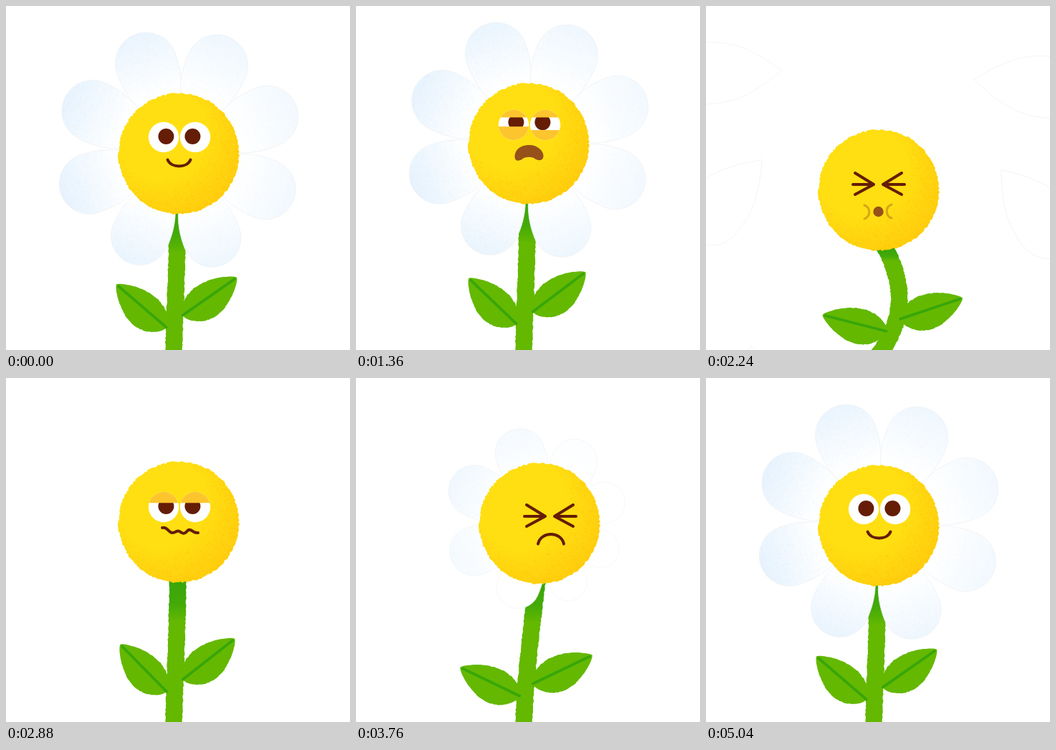
An HTML page with a canvas that plays this animation: 480 by 480 pixels, repeating every 5.12 s.

```html
<!DOCTYPE html>
<html lang="en">
<head>
<meta charset="utf-8">
<title>Sneezing daisy</title>
<style>
html, body { margin: 0; width: 100%; height: 100%; overflow: hidden; background: #fff; }
canvas { display: block; width: 480px; height: 480px; }
</style>
</head>
<body>
<canvas id="stage" width="480" height="480"></canvas>
<script>
const LOOP = 5120, STEP = 80, TAU = Math.PI * 2;
const BROWN = '#651d06', MOUTH = '#96501a', GREEN = '#64b800', DARK = '#38a60a', LID = '#fcc52e';
const INHALE = 400, SNEEZE = 1840, BURST = 1920, CALM = 2440, STRAIN = 3440, SPROUT = 3520, RELIEF = 4080;
const CENTER = 241;
const ctx = document.getElementById('stage').getContext('2d');

let seed = 7;
const rnd = () => (seed = seed * 16807 % 2147483647) / 2147483647;
const clamp = x => Math.max(0, Math.min(1, x));
const mix = (a, b, k) => a + (b - a) * k;
const ease = x => x * x * (3 - 2 * x);
const progress = (t, from, to) => clamp((t - from) / (to - from));

// face: drop of the face on the head; fold, lift: leaves; top, low: eyelids; gape: mouth
const idle = { headY: 206, face: 0, fold: 0, lift: 0, top: 0, low: 0, gape: .3 };
const breathe = { headY: 202, face: -2, fold: -1.5, lift: 1, top: 0, low: .35, gape: .7 };
const gasp = { headY: 192, face: -3, fold: -2.5, lift: 5, top: .26, low: .45, gape: 1 };
const brim = { headY: 176, face: -6, fold: -4, lift: 6, top: .4, low: .5, gape: 1.3 };
const sneeze = { headY: 257, face: 15, fold: 22, lift: -5, top: .8, low: 0, gape: 1 };
const tired = { headY: 201, face: 2, fold: -4, lift: 11, top: .37, low: 0, gape: 1 };
const push = { headY: 203, face: 13, fold: 12.5, lift: 5, top: .6, low: 0, gape: 1 };
const leap = { headY: 184, face: -2, fold: -4, lift: 6, top: 0, low: 0, gape: 1 };
const timeline = [[0, idle], [320, idle], [560, breathe], [1360, gasp], [1680, brim], [SNEEZE, brim],
  [2000, sneeze], [2240, sneeze], [2640, tired], [2960, tired], [STRAIN, push], [3760, push],
  [4160, leap], [4560, idle], [LOOP, idle]];

function poseAt(t) {
  const i = timeline.findIndex(([time]) => time > t);
  const [t0, a] = timeline[i - 1], [t1, b] = timeline[i];
  const k = ease(progress(t, t0, t1)), pose = {};
  for (const key in a) pose[key] = mix(a[key], b[key], k);
  pose.headY -= 9 * Math.sin(Math.PI * progress(t, 560, 1360));
  return pose;
}

// Shiver while the petals sprout
const swayAt = t => t < SPROUT || t > 4160 ? 0
  : 15 * Math.cos(Math.PI * (t - 3760) / 80) * (1 - progress(t, 3760, 4160));

const petals = Array.from({ length: 8 }, (_, i) => {
  const even = (i * 45 - 112.5) * Math.PI / 180;
  const angle = even + .032 - .038 * Math.cos(even), up = Math.sin(angle);
  return {
    angle,
    full: 1 - .06 * Math.max(0, up),
    lead: -28 * Math.cos(angle - .44),
    reach: 90 + 220 * up * up,
    tint: .75 - .25 * Math.cos(angle)
  };
});

const petalShape = new Path2D('M30 0C70-32 97-43 134-43A43 43 0 0 1 134 43C97 43 70 32 30 0Z');
const smile = new Path2D('M-16-4C-11 8 11 8 16-4');
const frown = new Path2D('M-18 6C-14-12 14-12 18 6');
const wavy = new Path2D('M-25-4C-18-6-16 3-11 3S-5-1-1 1 3 5 7 3 10-2 14-1 19 4 25 3');
const gaping = new Path2D('M-20 6C-20-6-10-11 0-11C12-11 20-3 20 4C20 12 12 11 8 8C4 5-6 5-10 9C-15 12-20 11-20 6Z');
const puffs = new Path2D('M-20-9C-11-6-11 6-20 10M18-10C9-7 9 6 18 9');
const squint = new Path2D('M-33-16L-7 0L-33 14M-36 0H-7M32-16L6 0L32 14M6 0H36');
const vein = new Path2D('M1 0H89');

function polygon(points) {
  const path = new Path2D();
  points.forEach(([x, y]) => path.lineTo(x, y));
  path.closePath();
  return path;
}

function sprite(width, height, ox, oy, paint) {
  const image = document.createElement('canvas');
  image.width = width;
  image.height = height;
  const g = image.getContext('2d');
  g.translate(ox, oy);
  paint(g);
  return image;
}

const head = sprite(180, 180, 90, 90, g => {
  g.fillStyle = '#ffdf12';
  const edge = polygon(Array.from({ length: 200 }, (_, i) => {
    const a = i / 200 * TAU, r = 83 + rnd() * 2.2;
    return [r * Math.cos(a), r * Math.sin(a)];
  }));
  g.fill(edge);
  g.clip(edge);
  const shade = g.createRadialGradient(-25, -28, 62, -25, -28, 122);
  shade.addColorStop(0, 'rgba(255,200,14,0)');
  shade.addColorStop(1, 'rgba(255,200,14,.75)');
  g.fillStyle = shade;
  g.fillRect(-90, -90, 180, 180);
  g.fillStyle = 'rgba(255,194,10,.25)';
  for (let i = 0; i < 6000; i++) {
    const x = rnd() * 170 - 85, y = rnd() * 170 - 85;
    if (rnd() < (Math.hypot(x + 25, y + 28) - 62) / 60) g.fillRect(x, y, 1.6, 1.6);
  }
});

const blush = sprite(190, 100, 0, 50, g => {
  g.clip(petalShape);
  const shade = g.createLinearGradient(85, 0, 178, 0);
  shade.addColorStop(0, 'rgba(228,242,254,0)');
  shade.addColorStop(1, 'rgba(228,242,254,.9)');
  g.fillStyle = shade;
  g.fillRect(80, -50, 110, 100);
  g.fillStyle = 'rgba(218,236,252,.25)';
  for (let i = 0; i < 3000; i++) {
    const x = 80 + rnd() * 100;
    if (rnd() < (x - 80) / 100) g.fillRect(x, rnd() * 90 - 45, 1.2, 1.2);
  }
});

const leafSide = width => Array.from({ length: 45 }, (_, i) => {
  const s = i / 44;
  return [93 * s, (width + rnd()) * Math.max(0, Math.sin(Math.PI * s ** .8)) ** .75];
});
const leafShape = polygon([...leafSide(-22.5), ...leafSide(27).reverse()]);
const roughness = Array.from({ length: 162 }, () => 11.2 + rnd() * 1.3);

function at(x, y, draw) {
  ctx.save();
  ctx.translate(x, y);
  draw();
  ctx.restore();
}

function disc(x, y, r, color) {
  ctx.fillStyle = color;
  ctx.beginPath();
  ctx.arc(x, y, r, 0, TAU);
  ctx.fill();
}

function line(path, color, width) {
  ctx.strokeStyle = color;
  ctx.lineWidth = width;
  ctx.stroke(path);
}

function drawStem(hx, hy, bend) {
  const xs = [233.5, 236 + bend * 49, mix(238, hx, .4) + bend * 37, hx - 1];
  const ys = [0, 1, 2, 3].map(i => mix(495, hy + 63, i / 3));
  const cubic = (p, t) => {
    const u = 1 - t;
    return u * u * u * p[0] + 3 * u * u * t * p[1] + 3 * u * t * t * p[2] + t * t * t * p[3];
  };
  const left = [], right = [];
  for (let i = 0; i <= 80; i++) {
    const t = i / 80, x = cubic(xs, t), y = cubic(ys, t);
    const dx = cubic(xs, t + .01) - x, dy = cubic(ys, t + .01) - y, len = Math.hypot(dx, dy);
    const a = roughness[i] / len, b = roughness[i + 81] / len;
    left.push([x + dy * a, y - dx * a]);
    right.unshift([x - dy * b, y + dx * b]);
  }
  const shade = ctx.createLinearGradient(0, hy + 84, 0, hy + 139 - bend * 40);
  shade.addColorStop(0, DARK);
  shade.addColorStop(.55, '#43aa08');
  shade.addColorStop(1, GREEN);
  ctx.fillStyle = shade;
  ctx.fill(polygon([...left, ...right]));
}

function drawLeaf(x, y, side, degrees) {
  at(x, y, () => {
    ctx.scale(side, 1);
    ctx.rotate(-degrees * Math.PI / 180);
    ctx.fillStyle = GREEN;
    ctx.fill(leafShape);
    line(vein, DARK, 3.8);
  });
}

function drawPetal(x, y, angle, size, tint) {
  at(x, y, () => {
    ctx.rotate(angle);
    ctx.scale(size, size);
    ctx.translate(-134, 0);
    ctx.fillStyle = '#fff';
    ctx.fill(petalShape);
    ctx.globalAlpha = tint;
    ctx.drawImage(blush, 0, -50);
    ctx.globalAlpha = 1;
    line(petalShape, '#eff2f5', .8);
  });
}

function drawPetals(t, hx, hy, sway) {
  if (t >= CALM && t < SPROUT) return;
  const flying = t >= BURST && t < CALM, u = (t - SNEEZE) / 400;
  for (const { angle, full, lead, reach, tint } of petals) {
    const cos = Math.cos(angle), sin = Math.sin(angle);
    if (flying) {
      const d = 134 + reach * Math.sqrt(u), fall = 160 * Math.max(0, u - .8) ** 2;
      drawPetal(CENTER + d * cos, 206 + d * sin + fall, angle + u * .5 * Math.sign(cos), 1, 0);
    } else {
      const k = progress(t + lead, SPROUT, 3900);
      const pop = 1.06 * ease(k) - .06 * progress(t, 3900, 4000);
      const size = t < BURST ? full : full * pop;
      drawPetal(hx + sway * .65 + 134 * size * cos, hy + Math.abs(sway) * .3 + 134 * size * sin,
        angle, size, tint * clamp((size - .7) / .22));
    }
  }
}

function drawEye(x, top, low, px, py) {
  at(x, 0, () => {
    ctx.beginPath();
    ctx.arc(0, 0, 21.2, 0, TAU);
    ctx.clip();
    ctx.fillStyle = '#fff';
    ctx.fillRect(-22, -22, 44, 44);
    disc(px, py, 11, BROWN);
    ctx.fillStyle = LID;
    ctx.fillRect(-22, -22, 44, 44 * top);
    ctx.fillRect(-22, 22 - 44 * low, 44, 44 * low);
  });
}

function drawMouth(t, gape) {
  if (t < INHALE || t >= RELIEF) at(.5, 35.5, () => line(smile, BROWN, 4));
  else if (t < SNEEZE) at(.5, 39, () => {
    ctx.scale(gape, gape);
    ctx.fillStyle = MOUTH;
    ctx.fill(gaping);
  });
  else if (t < CALM) at(0, 38, () => {
    disc(-.5, 0, 7.2, MOUTH);
    line(puffs, '#d6a616', 3);
  });
  else if (t < STRAIN) at(2, 33, () => line(wavy, BROWN, 4));
  else at(1, 32.5, () => line(frown, BROWN, 4));
}

function drawFace(t, x, y, { top, low, gape }) {
  at(x, y, () => {
    if ((t >= SNEEZE && t < CALM) || (t >= STRAIN && t < RELIEF)) line(squint, BROWN, 4);
    else {
      const look = -1 - 6 * low;
      drawEye(-21, top, low, 3.4, look);
      drawEye(23, top, low * .75, -3.6, look);
    }
    drawMouth(t, gape);
  });
}

function render(now) {
  const t = Math.floor(now % LOOP / STEP) * STEP;
  const pose = poseAt(t), sway = swayAt(t);
  const hx = CENTER + sway, hy = pose.headY;
  const bend = clamp((hy - 212) / 45);
  ctx.fillStyle = '#fff';
  ctx.fillRect(0, 0, 480, 480);
  drawStem(hx, hy, bend);
  drawLeaf(224.5 + sway * .3 + 28 * bend, 449 - pose.lift, -1, 40.7 - 1.2 * pose.fold);
  drawLeaf(246 + 24 * bend, 432 - pose.lift, 1, 35 - .75 * pose.fold);
  drawPetals(t, hx, hy, sway);
  ctx.drawImage(head, hx - 90, hy - 90);
  drawFace(t, hx + sway, hy - 23 + pose.face, pose);
  requestAnimationFrame(render);
}

ctx.lineCap = ctx.lineJoin = 'round';
render(0);
</script>
</body>
</html>
```
